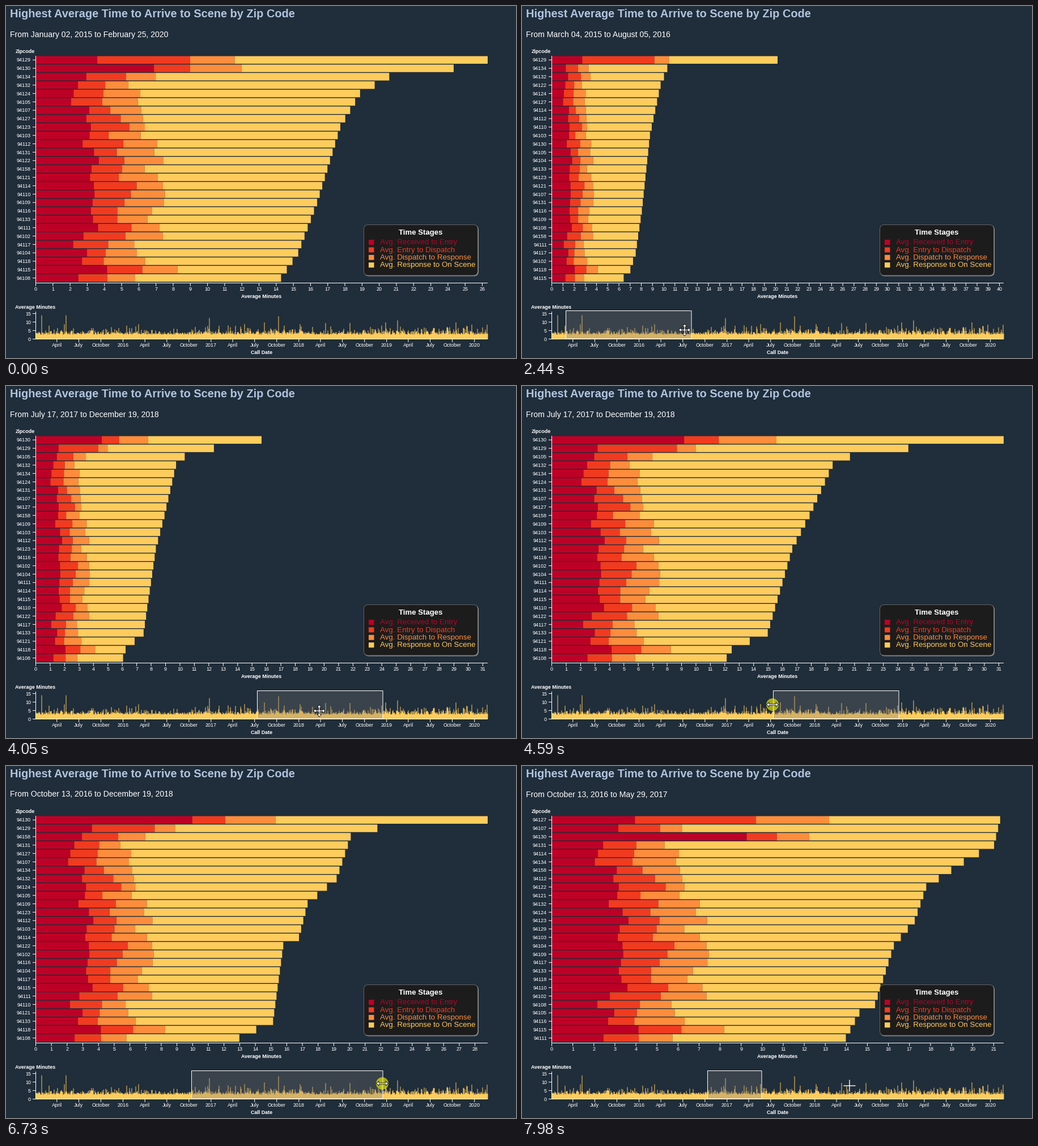
Recreate the animation shown at these times as a matplotlib script. Size 900 px wide and 622 px high, loop 8000 ms.

```python
from collections import namedtuple

import matplotlib.pyplot as plt
import numpy as np
from matplotlib.animation import FuncAnimation
from matplotlib.collections import LineCollection, PolyCollection
from matplotlib.patches import Circle, FancyBboxPatch, PathPatch, Polygon, Rectangle
from matplotlib.path import Path
from matplotlib.transforms import Affine2D

plt.rcParams["path.snap"] = False

W, H, DPI = 900, 622, 100
LOOP, STEP = 8000, 40
LEFT, RIGHT, TOP, PITCH, BAR = 52, 850, 88.6, 14.82, 13.4
SPAN = RIGHT - LEFT
ROWS = 27
COLORS = ["#bd0026", "#f03b20", "#fd8d3c", "#fecc5c"]
STAGES = ["Received to Entry", "Entry to Dispatch",
          "Dispatch to Response", "Response to On Scene"]
STAGE_MEAN, STAGE_SPREAD = (3.05, 1.8, 1.95), (0.45, 0.45, 0.5)
GROW = 480

View = namedtuple("View", "start dates zips peak ends")


def view(start, dates, zips, totals, heads):
    """totals: (row, minutes) key points; heads: stage minutes of the top rows."""
    rng = np.random.default_rng(ROWS)
    total = np.interp(np.arange(ROWS), *zip(*totals))
    parts = rng.normal(STAGE_MEAN, STAGE_SPREAD, (ROWS, 3)).clip(0.9)
    parts[:len(heads)] = heads
    ends = np.column_stack([np.zeros(ROWS), parts.cumsum(axis=1), total]).T
    return View(start, dates, ["94" + z for z in zips.split()],
                total[0], ends * SPAN / total[0])


VIEWS = [
    view(-GROW, "From January 02, 2015 to February 25, 2020",
         "129 130 134 132 124 105 107 127 123 103 112 131 122 158 "
         "121 114 110 109 116 133 111 102 117 104 118 115 108",
         [(0, 26.33), (1, 24.35), (2, 20.6), (4, 18.9), (8, 17.75),
          (17, 16.4), (23, 15.3), (26, 14.3)],
         [(3.6, 5.4, 2.6), (6.9, 2.1, 3.0)]),
    view(2210, "From March 04, 2015 to August 05, 2016",
         "129 134 132 122 124 127 114 112 110 103 130 105 104 133 "
         "123 121 107 131 116 109 108 158 111 117 102 118 115",
         [(0, 40.4), (1, 20.7), (3, 19.5), (9, 17.6), (18, 16.15),
          (23, 15.05), (25, 14.1), (26, 12.9)],
         [(5.5, 12.9, 2.6)]),
    view(3760, "From July 17, 2017 to December 19, 2018",
         "130 129 105 132 134 124 131 107 127 158 109 103 112 123 "
         "116 102 104 111 114 115 110 122 117 133 121 118 108",
         [(0, 31.36), (1, 24.75), (2, 20.7), (3, 19.5), (9, 17.9),
          (13, 16.7), (23, 15), (25, 12.5), (26, 12.15)],
         [(9.2, 2.4, 4.0), (3.2, 5.5, 1.3)]),
    view(5408, "From October 13, 2016 to December 19, 2018",
         "130 129 158 131 127 107 134 132 124 105 109 123 112 103 "
         "114 122 102 116 104 117 115 111 110 121 133 118 108",
         [(0, 28.83), (1, 21.8), (2, 20.1), (7, 19.2), (10, 17.35),
          (14, 16.8), (15, 15.8), (24, 15.15), (26, 13)],
         [(10, 2.1, 3.2), (3.6, 4.0, 1.3)]),
    view(7560, "From October 13, 2016 to May 29, 2017",
         "127 107 130 131 114 134 158 112 122 121 132 124 123 129 "
         "103 104 109 117 133 118 110 102 108 105 116 115 111",
         [(0, 21.49), (3, 21.2), (5, 19.75), (8, 17.95), (12, 17.4),
          (15, 16.4), (22, 15.5), (23, 14.75), (26, 14.1)],
         [(4, 5.8, 3.5), (3.2, 2.0, 1.05), (9.35, 1.45, 1.55)]),
]

# Pointer moves: first ms, last ms, goal x, goal y
ENTRY = (731, 612)
MOVES = [(150, 900, 41, 553), (980, 1130, 79, 570), (1440, 2060, 299, 572),
         (2210, 2980, 247, 574), (3060, 3590, 613, 580), (3760, 4360, 442, 563),
         (4590, 5130, 326, 570), (5280, 5670, 616, 560), (5670, 6220, 658, 560),
         (6360, 6500, 664, 561), (6730, 7500, 422, 576), (7500, 7580, 449, 563),
         (7580, 7980, 578, 565)]
DRAW, SLIDE, PULL_LEFT, PULL_RIGHT = (1440, 2060), (3060, 3590), (4590, 5130), (6730, 7500)
PRESSES = [(1300, 2210), (2980, 3760), (4590, 5280), (6500, 7540)]
# The screen refreshes every 80 ms while something moves
TICKS = np.concatenate([[0]] + [np.append(np.arange(a, b, 80), b) for a, b, *_ in MOVES])

fig = plt.figure(figsize=(W / DPI, H / DPI), dpi=DPI, facecolor="#202d3a")
ax = fig.add_axes([0, 0, 1, 1])
ax.set(xlim=(0, W), ylim=(H, 0))
ax.axis("off")


def px(n):
    return n * 72 / DPI


def label(x, y, s, size=9, color="white", ha="center", bold=False, z=3):
    return ax.text(x, y, s, fontsize=px(size), color=color, ha=ha, va="baseline",
                   family="Liberation Sans", zorder=z,
                   weight="bold" if bold else "normal")


def lines(segments):
    return ax.add_collection(LineCollection(
        segments, colors="white", linewidths=px(1), zorder=3))


def row_y(i):
    return TOP + PITCH * i


# Headings and bar chart
label(7, 20.5, "Highest Average Time to Arrive to Scene by Zip Code",
      20, "#b0c4de", "left", True)
subtitle = label(7, 54.5, "", 14, ha="left")
label(17, 83, "Zipcode", 8.9, ha="left", bold=True)
label(451, 516, "Average Minutes", 8.9, bold=True)

bars = [ax.add_collection(PolyCollection([], facecolors=c, linewidths=0, zorder=2))
        for c in COLORS]
mid = [row_y(i) + BAR / 2 for i in range(ROWS)]
zip_labels = [label(44, y + 3.2, "", ha="right") for y in mid]
lines([[(47, y), (52, y)] for y in mid]
      + [[(52.5, 88), (52.5, 489.5)], [(52, 489.5), (RIGHT, 489.5)]])
minute_ticks = lines([])
minute_labels = [label(0, 503.2, str(i)) for i in range(41)]

# Legend
for shift, face, edge in [(1, "#9a9a9a", "#9a9a9a"), (0, "#1d1c1c", "#626262")]:
    ax.add_patch(FancyBboxPatch(
        (631.5 + shift, 386.5 + shift), 201, 89.5, zorder=4,
        boxstyle="round,pad=0,rounding_size=8",
        facecolor=face, edgecolor=edge, linewidth=px(1)))
label(732, 404, "Time Stages", 13.2, bold=True, z=5)
for i, (stage, color) in enumerate(zip(STAGES, COLORS)):
    y = 417.3 + 13.4 * i
    ax.add_patch(Rectangle((640, y - 4.3), 9.5, 9, color=color, lw=0, zorder=5))
    label(660, y + 4, "Avg. " + stage, 13.4, color, "left", z=5)

# Timeline
label(16, 535, "Average Minutes", 8.9, ha="left", bold=True)
label(451, 615, "Call Date", 8.9, bold=True)
DAYS, BASE, UNIT = 1880, 588, 3
rng = np.random.default_rng(7)
calls = np.minimum(2.6 + rng.gamma(1.3, 1.15, SPAN + 1), 9.8)
for x, peak in [(62, 14), (105, 14), (358, 12.3), (480, 13.4), (690, 11)]:
    calls[x - LEFT] = peak
ax.fill_between(LEFT + np.arange(SPAN + 1), BASE, BASE - UNIT * calls,
                step="post", color=COLORS[3], lw=0, zorder=2)

axis = [[(52.5, 540), (52.5, BASE)], [(52, 588.5), (RIGHT, 588.5)]]
for v in range(0, 16, 5):
    y = 588.5 - UNIT * v
    axis.append([(47, y), (52, y)])
    label(44, y + 3.2, str(v), ha="right")
names = {4: "April", 7: "July", 10: "October"}
for q in np.arange("2015-04", "2020-02", 3, dtype="datetime64[M]"):
    days = (q.astype("datetime64[D]") - np.datetime64("2015-01-02")).astype(int)
    x = LEFT + days * SPAN / DAYS
    year, month = str(q).split("-")
    axis.append([(x, 589), (x, 594)])
    label(x, 602.5, names.get(int(month), year))
lines(axis)

brush = ax.add_patch(Rectangle((0, 538.5), 1, 49.5, zorder=6, linewidth=px(1),
                               facecolor=(0.47, 0.47, 0.47, 0.3), edgecolor="white"))

# Pointer shapes
halo = ax.add_patch(Circle((0, 0), 11, color="yellow", alpha=0.6, lw=0, zorder=7))


def arrows(n):
    arm = np.array([1.1 - 1.1j, 6 - 1.1j, 6 - 4j, 10.5, 6 + 4j, 6 + 1.1j])
    pts = np.concatenate([arm * np.exp(2j * np.pi * k / n) for k in range(n)])
    return np.column_stack([pts.real, pts.imag])


def shape(points):
    return ax.add_patch(Polygon(points, closed=True, facecolor="white",
                                edgecolor="black", linewidth=px(0.8), zorder=8))


cross = Path([(-10.5, 0), (10.5, 0), (0, -10.5), (0, 10.5)], [1, 2, 1, 2])
cursors = {
    "cross": ax.add_patch(PathPatch(cross, facecolor="none", edgecolor="#f4ecea",
                                    linewidth=px(1.5), zorder=8)),
    "resize": shape(arrows(2)),
    "move": shape(arrows(4)),
    "arrow": shape([(0, 0), (0, 16), (4, 12.5), (6.5, 18), (9, 17),
                    (6.5, 11.5), (11.5, 11.5)]),
}


def pointer(t):
    pos = np.array(ENTRY, float)
    for start, end, *goal in MOVES:
        p = np.clip((t - start) / (end - start), 0, 1)
        pos += (goal - pos) * p * p * (3 - 2 * p)
    return pos


def dragged(t, span):
    return pointer(np.clip(t, *span))[0] - pointer(span[0])[0]


def brush_edges(t):
    slide = dragged(t, SLIDE)
    return (78 + slide + dragged(t, PULL_LEFT),
            79.5 + slide + dragged(t, DRAW) + dragged(t, PULL_RIGHT))


def cursor_kind(t, x, y, lo, hi):
    if t < MOVES[0][0]:
        return None
    if x < LEFT or y > BASE:
        return "arrow"
    if t <= DRAW[1]:
        return "cross"
    if min(abs(x - lo), abs(x - hi)) < 5:
        return "resize"
    return "move" if lo < x < hi else "cross"


def cubic_in_out(p):
    p = min(max(p, 0), 1)
    return 4 * p ** 3 if p < 0.5 else 1 - 4 * (1 - p) ** 3


def draw_chart(t):
    v = [v for v in VIEWS if v.start <= t][-1]
    subtitle.set_text(v.dates)
    for text, z in zip(zip_labels, v.zips):
        text.set_text(z)
    edges = LEFT + v.ends * cubic_in_out((t - v.start) / GROW)
    for coll, starts, stops in zip(bars, edges, edges[1:]):
        coll.set_verts([[(a, y), (b, y), (b, y + BAR), (a, y + BAR)]
                        for a, b, y in zip(starts, stops, row_y(np.arange(ROWS)))])
    xs = LEFT + 0.5 + np.arange(int(v.peak) + 1) * SPAN / v.peak
    minute_ticks.set_segments([[(x, 490), (x, 495)] for x in xs])
    for i, text in enumerate(minute_labels):
        text.set_visible(i < len(xs))
        if i < len(xs):
            text.set_x(xs[i])


def draw(frame):
    now = frame * STEP + 30
    t = TICKS[TICKS <= now][-1]
    draw_chart(t)

    lo, hi = brush_edges(t)
    brush.set_visible(t >= DRAW[0])
    brush.set_x(lo - 0.5)
    brush.set_width(hi - lo)

    x, y = pointer(t)
    kind = cursor_kind(t, x, y, lo, hi)
    for name, art in cursors.items():
        art.set_visible(name == kind)
        art.set_transform(Affine2D().translate(x, y) + ax.transData)
    halo.set_center((x, y))
    halo.set_visible(any(a <= now < b for a, b in PRESSES))


anim = FuncAnimation(fig, draw, frames=LOOP // STEP, interval=STEP,
                     init_func=lambda: draw(0), repeat=True, repeat_delay=0)
plt.show()
```
